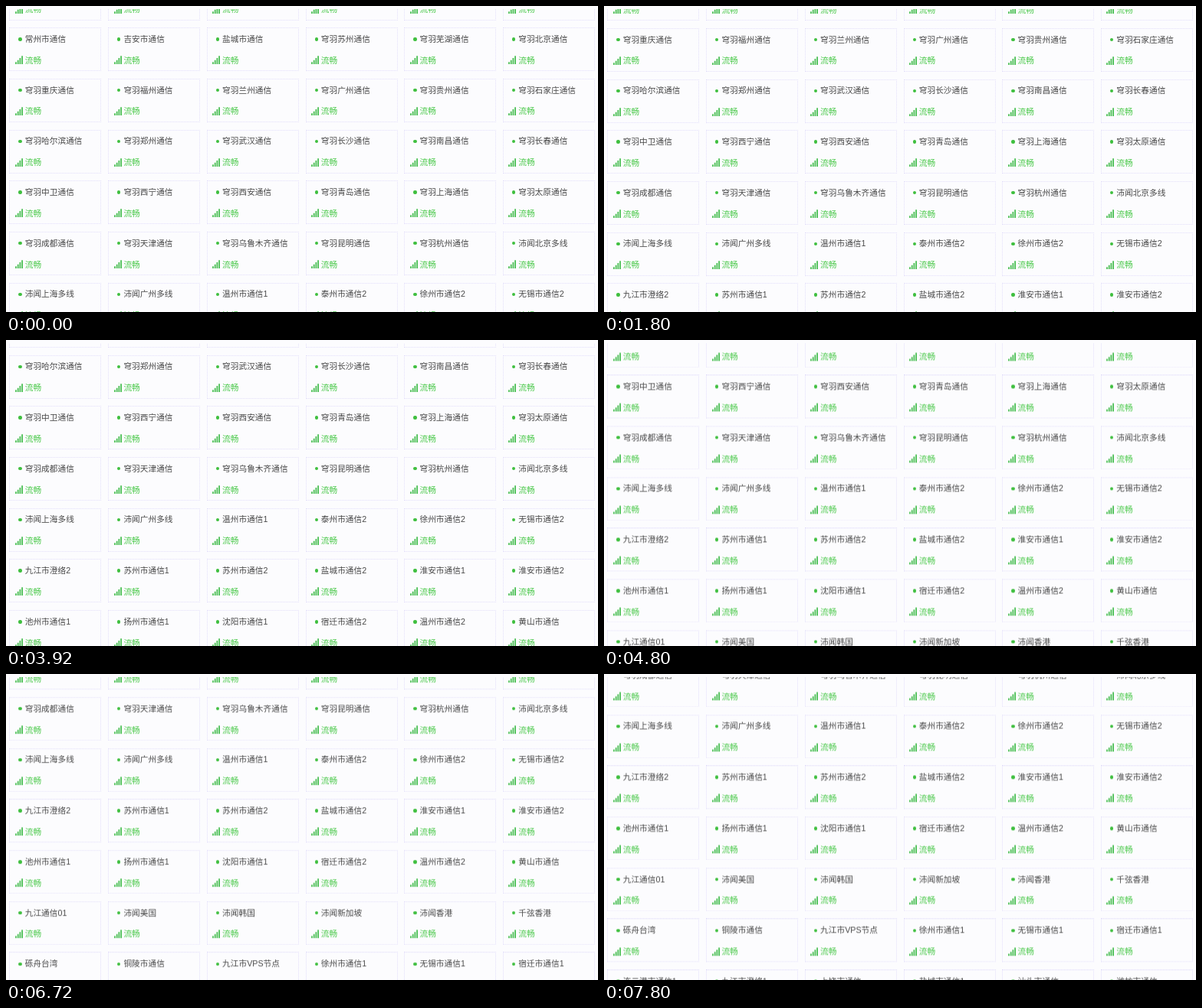
An HTML page for the animation above (8 s loop, 772x400 px).

```html
<!DOCTYPE html>
<html lang="zh-CN">
<head>
<meta charset="utf-8">
<title>节点状态</title>
<style>
html, body { margin: 0; width: 100%; height: 100%; overflow: hidden; background: #fcfcfe; }
#view { position: absolute; left: 0; top: 0; width: 772px; height: 400px; overflow: hidden; clip-path: inset(4px 0 0 0); }
#list { position: absolute; left: 0; top: 0; will-change: transform; }
.cell {
  position: absolute; box-sizing: border-box; width: 120px; height: 57px;
  border: 1px dotted #e2defa;
  font: 10.7px/20px "Liberation Sans", "Noto Sans CJK SC", sans-serif; white-space: nowrap;
}
.cell > * { position: absolute; }
.dot { left: 11px; top: 12.2px; width: 4.4px; height: 4.4px; border-radius: 50%; background: #3fbf3f; }
.name { left: 19.3px; top: 3.9px; color: #484848; }
.state { left: 19.3px; top: 31.6px; color: #48c848; }
.bars { left: 6.6px; top: 36.2px; fill: none; stroke: #42bc4c; stroke-width: 1.7; }
</style>
</head>
<body>
<div id="view"><div id="list"></div></div>
<script>
const ROWS = [
  "常州市通信 吉安市通信 盐城市通信 穹羽苏州通信 穹羽芜湖通信 穹羽北京通信",
  "穹羽重庆通信 穹羽福州通信 穹羽兰州通信 穹羽广州通信 穹羽贵州通信 穹羽石家庄通信",
  "穹羽哈尔滨通信 穹羽郑州通信 穹羽武汉通信 穹羽长沙通信 穹羽南昌通信 穹羽长春通信",
  "穹羽中卫通信 穹羽西宁通信 穹羽西安通信 穹羽青岛通信 穹羽上海通信 穹羽太原通信",
  "穹羽成都通信 穹羽天津通信 穹羽乌鲁木齐通信 穹羽昆明通信 穹羽杭州通信 沛闻北京多线",
  "沛闻上海多线 沛闻广州多线 温州市通信1 泰州市通信2 徐州市通信2 无锡市通信2",
  "九江市澄络2 苏州市通信1 苏州市通信2 盐城市通信2 淮安市通信1 淮安市通信2",
  "池州市通信1 扬州市通信1 沈阳市通信1 宿迁市通信2 温州市通信2 黄山市通信",
  "九江通信01 沛闻美国 沛闻韩国 沛闻新加坡 沛闻香港 千弦香港",
  "砾舟台湾 铜陵市通信 九江市VPS节点 徐州市通信1 无锡市通信1 宿迁市通信1",
  "连云港市通信1 九江市澄络1 上饶市通信 盐城市通信1 汕头市通信 潍坊市通信"
].map(row => row.split(" "));
ROWS.unshift(Array(6).fill("")); // row above the stage, only its lower edge shows

const LEFT = 4.4, TOP = 28.2, COL = 128.7, ROW = 66.68, LOOP = 8000;
const HOLDS = [33, 64, 79]; // ticks on which the list rests
// [moves made, pixels scrolled]
const SCROLL = [[0, 0], [18, 66], [27, 96], [38, 142], [47, 182.6], [65, 264.8], [76, 308.6]];

const list = document.getElementById("list");
list.innerHTML = ROWS.map((row, r) => row.map((name, c) => `
  <div class="cell" style="left:${LEFT + c * COL}px;top:${TOP + (r - 1) * ROW}px">
    <i class="dot"></i><span class="name">${name}</span>
    <svg class="bars" width="11" height="11"><path d="M1 11v-2.7M3.7 11v-5.3M6.4 11v-8M9.1 11v-10.7"/></svg>
    <span class="state">流畅</span>
  </div>`).join("")).join("");

function scrollAt(t) {
  const tick = 2 * Math.floor(t / 200) + (t % 200 >= 120 ? 1 : 0);
  const moves = tick - HOLDS.filter(h => tick >= h).length;
  const i = Math.max(1, SCROLL.findIndex(([m]) => m >= moves));
  const [m0, y0] = SCROLL[i - 1], [m1, y1] = SCROLL[i];
  return y0 + (y1 - y0) * (moves - m0) / (m1 - m0);
}

const start = performance.now();
function draw() {
  const t = (performance.now() - start) % LOOP;
  list.style.transform = `translateY(${-scrollAt(t)}px)`;
  requestAnimationFrame(draw);
}
draw();
</script>
</body>
</html>
```
